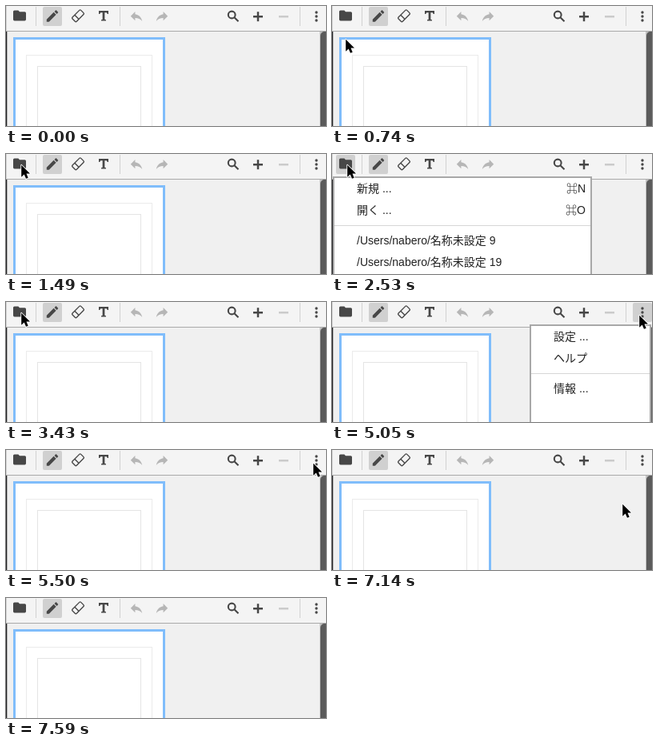
These frames come from a looping animation (400x150 px, 8.03 s). An HTML page with a canvas:

```html
<!DOCTYPE html>
<html lang="ja">
<head>
<meta charset="utf-8">
<title>Toolbar menus</title>
<style>
html, body { margin: 0; width: 100%; height: 100%; overflow: hidden; background: #f0f0f0; }
canvas { display: block; }
</style>
</head>
<body>
<canvas id="stage" width="400" height="150"></canvas>
<script>
const ctx = document.getElementById('stage').getContext('2d');
const LOOP = 8030;
const DARK = '#474747', FAINT = '#b6b6b6', PALE = '#cbcbcb';
const FONT = '14px "Liberation Sans", "Noto Sans CJK JP", "DejaVu Sans", sans-serif';

// Pointer steps: time, x, y; a step without a place hides the pointer.
const POINTER = [
  [0], [450, 36, 110], [600, 14, 51], [740, 16, 41], [890, 16, 33], [1040, 18, 13],
  [3730, 35, 13], [3880, 284, -6], [4030, 286, -7], [4170, 310, -2], [4320, 358, 5],
  [4470, 376, 11], [4610, 381, 16], [4760, 383, 16],
  [7140, 362, 67], [7290, 345, 104], [7440, 337, 142], [7590]
];

const FILE_MENU = {
  from: 2530, to: 3430, button: 5, x: 2, right: 325,
  rows: [['新規 ...', 48, '⌘N'], ['開く ...', 75, '⌘O'],
         ['/Users/nabero/名称未設定 9', 113], ['/Users/nabero/名称未設定 19', 140]],
  rule: 89
};
const MORE_MENU = {
  from: 5050, to: 5500, button: 376, x: 248, right: 399,
  rows: [['設定 ...', 48], ['ヘルプ', 75], ['情報 ...', 113]],
  rule: 89
};

const icons = {
  folder: new Path2D('M10 4H4c-1.1 0-2 .9-2 2v12c0 1.1.9 2 2 2h16c1.1 0 2-.9 2-2V8c0-1.1-.9-2-2-2h-8z'),
  pencil: new Path2D('M3 17.25V21h3.75L17.8 9.94l-3.75-3.75zM20.7 7.04c.4-.4.4-1 0-1.4l-2.34-2.35c-.4-.4-1-.4-1.4 0l-1.83 1.83 3.75 3.75z'),
  text: new Path2D('M4.5 4h15v5h-1.6c-.4-1.8-.9-2.4-2.4-2.4h-1.8V16.5c0 1.1.4 1.4 2 1.5v1.6H8.3V18c1.6-.1 2-.4 2-1.5V6.6H8.5C7 6.6 6.500 7.2 6.100 9H4.500z'),
  reply: new Path2D('M10 9V5l-7 7 7 7v-4.1c5 0 8.5 1.6 11 5.1-1-5-4-10-11-11z'),
  arrow: new Path2D('M1.200 .8V15.700L4.700 12.500L7 17.800L9.700 16.700L7.500 11.600H12z')
};

function rect(color, x, y, w, h) {
  ctx.fillStyle = color;
  ctx.fillRect(x, y, w, h);
}

function frame(color, x, y, w, h, line = 1) {
  ctx.strokeStyle = color;
  ctx.lineWidth = line;
  ctx.strokeRect(x + line / 2, y + line / 2, w - line, h - line);
}

function rounded(color, x, y, w, h, radius) {
  ctx.fillStyle = color;
  ctx.beginPath();
  ctx.roundRect(x, y, w, h, radius);
  ctx.fill();
}

function icon(path, cx, cy, color, flip = 1) {
  ctx.save();
  ctx.translate(cx, cy);
  ctx.scale(0.8 * flip, 0.8);
  ctx.translate(-12, -12);
  ctx.fillStyle = color;
  ctx.fill(path);
  ctx.restore();
}

function eraser(cx, cy) {
  ctx.save();
  ctx.translate(cx, cy);
  ctx.rotate(-Math.PI / 4);
  ctx.strokeStyle = DARK;
  ctx.lineWidth = 1.4;
  ctx.beginPath();
  ctx.roundRect(-7.5, -3.7, 15, 7.4, 1.4);
  ctx.moveTo(-2.2, -3.7);
  ctx.lineTo(-2.2, 3.7);
  ctx.stroke();
  ctx.restore();
}

function lens(cx, cy) {
  ctx.strokeStyle = DARK;
  ctx.lineWidth = 2.1;
  ctx.beginPath();
  ctx.arc(cx, cy, 4.4, 0, Math.PI * 2);
  ctx.moveTo(cx + 3.2, cy + 3.2);
  ctx.lineTo(cx + 8.3, cy + 8.3);
  ctx.stroke();
}

const button = x => rounded('#d0d0d0', x, 1, 24, 24, 2);

function toolbar(openMenu) {
  rect('#f4f4f4', 0, 0, 400, 31);
  rect('#d2d2d2', 0, 0, 1, 31);
  rect('#a9a9a9', 0, 31, 400, 1);
  [37, 142, 367].forEach(x => rect('#d2d2d2', x, 1, 1, 24));
  button(46);
  if (openMenu) button(openMenu.button);

  icon(icons.folder, 17, 12, DARK);
  icon(icons.pencil, 58, 12.5, DARK);
  eraser(90, 12.3);
  icon(icons.text, 122, 12.5, DARK);
  icon(icons.reply, 163, 12.7, FAINT);
  icon(icons.reply, 195, 12.7, FAINT, -1);
  lens(282.2, 11);
  rect(DARK, 309, 12, 12, 2.5);
  rect(DARK, 313.75, 7.2, 2.5, 12);
  rect(PALE, 341, 12, 12, 2.5);
  [8, 13, 18].forEach(y => {
    ctx.fillStyle = DARK;
    ctx.beginPath();
    ctx.arc(388, y, 1.7, 0, Math.PI * 2);
    ctx.fill();
  });
}

function page() {
  rect('#f0f0f0', 0, 32, 400, 118);
  rect('#1d1d20', 0, 32, 1, 118);
  rect('#b4b4b4', 1, 32, 1, 118);
  rect('#ffffff', 9, 39, 190, 130);
  frame('#80bdfb', 9, 39, 190, 130, 3);
  frame('#ebebeb', 25, 61, 158, 120);
  frame('#e4e4e4', 39, 75, 130, 100);
  rect('#c4c4c4', 392, 32, 8, 118);
  rounded('#5b5b5b', 393, 32, 14, 140, 5);
}

function menu({ x, right, rows, rule }) {
  rect('#ffffff', x, 28, right - x, 140);
  frame('#a8a8a8', x - 1, 28, right - x + 1, 140, 2);
  rect('#d6d6d6', x + 1, rule, right - x - 3, 1);
  ctx.font = FONT;
  ctx.fillStyle = '#222';
  for (const [label, y, keys] of rows) {
    ctx.textAlign = 'left';
    ctx.fillText(label, x + 29, y);
    if (keys) {
      ctx.textAlign = 'right';
      ctx.fillText(keys, right - 8, y);
    }
  }
}

function pointer(t) {
  const [, x, y] = POINTER.findLast(step => step[0] <= t);
  if (x === undefined) return;
  ctx.save();
  ctx.translate(x, y);
  ctx.lineJoin = 'round';
  ctx.lineWidth = 1.8;
  ctx.strokeStyle = '#fff';
  ctx.stroke(icons.arrow);
  ctx.fillStyle = '#000';
  ctx.fill(icons.arrow);
  ctx.restore();
}

function draw(t) {
  const open = [FILE_MENU, MORE_MENU].find(m => t >= m.from && t < m.to);
  page();
  toolbar(open);
  if (open) menu(open);
  pointer(t);
}

const start = performance.now();
function tick() {
  draw((performance.now() - start) % LOOP);
  requestAnimationFrame(tick);
}
tick();
</script>
</body>
</html>
```
